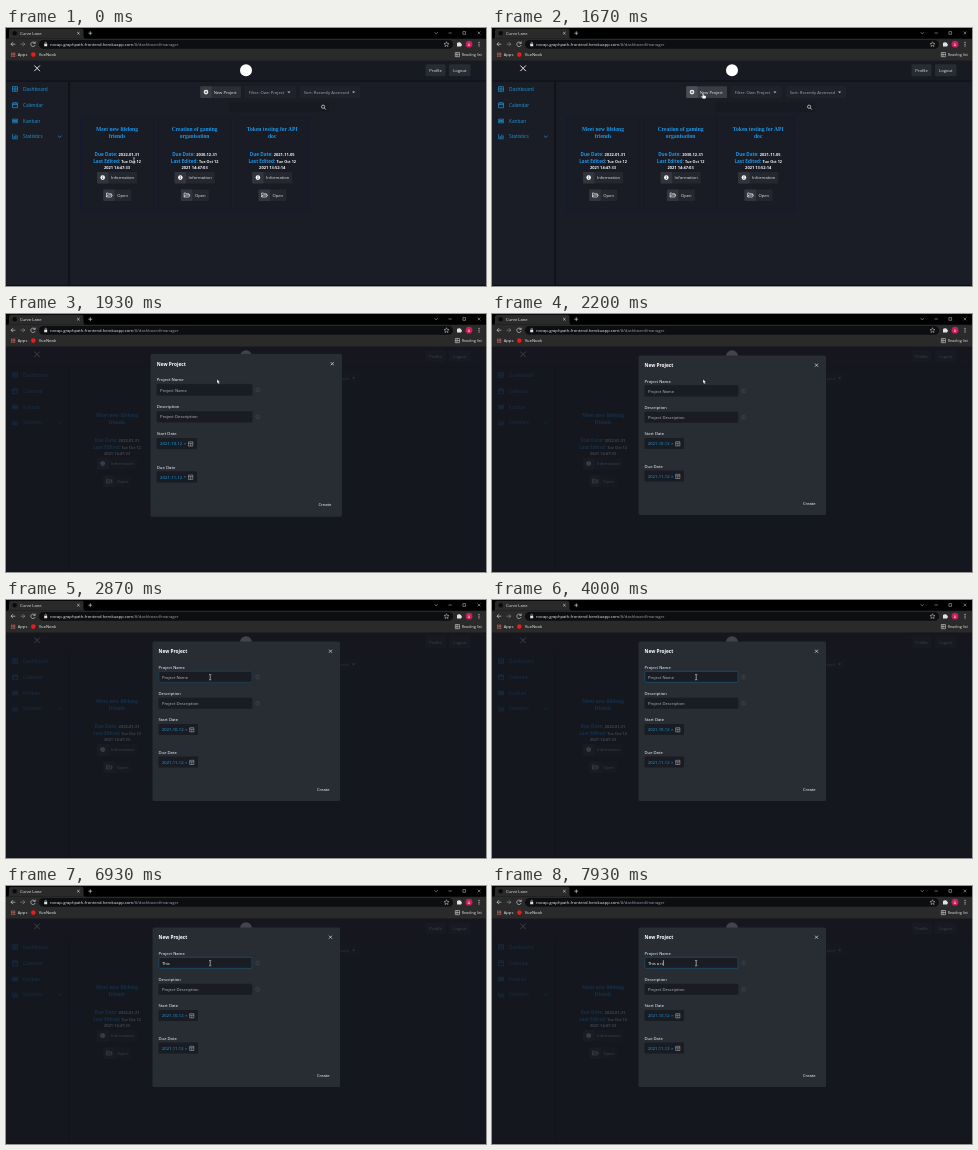
An HTML page for the animation above (8000 ms loop, 480 px wide and 258 px high).

```html
<!DOCTYPE html>
<html lang="en">
<head>
<meta charset="utf-8">
<title>New project dialog</title>
<style>
  html, body { margin: 0; width: 100%; height: 100%; overflow: hidden; background: #191c24; }
  svg { display: block; width: 100vw; height: 100vh; stroke-width: .7; }
  text { font: 4.18px "Open Sans", "Noto Sans", sans-serif; fill: #e4e6ea; white-space: pre; }
  #modal { transform-origin: 240.25px 121.25px; }
  .mid { text-anchor: middle; }
  .bar { font-size: 4.15px; fill: #e8eaed; }
  .side { font-size: 4.8px; fill: #2196dc; }
  .title { font: bold 5.55px "Liberation Serif", serif; fill: #1c96e8; }
  .key { font-size: 4.65px; font-weight: 700; fill: #1c96e8; }
  .val { font-size: 4px; font-weight: 700; fill: #f4f5f7; }
  .small { font-size: 3.75px; }
  .head { font-size: 4.75px; font-weight: 700; fill: #fff; }
  .label { fill: #fff; }
  .hint { fill: #b4b8be; }
  .date { fill: #259fe4; }
  .soft { fill: #a4a8b0; }
  .line { fill: none; stroke: #e4e6ea; }
  .blue { stroke: #2196dc; }
  .dim { opacity: .55; }
  .faint { opacity: .13; }
</style>
</head>
<body>
<svg viewBox="0 0 480 258" xmlns="http://www.w3.org/2000/svg">
  <g id="page">
    <rect width="480" height="258" fill="#1a1d25"/>
    <rect y="32" width="480" height="21" fill="#171a20"/>
    <rect y="52.5" width="480" height="1.2" fill="#0f1116"/>
    <rect x="62.3" y="53" width="1.8" height="205" fill="#101218"/>
    <path class="line" d="M28.3 37.5l5.6 5.6m0-5.6l-5.6 5.6" stroke-width="1"/>
    <circle cx="240" cy="42.3" r="6" fill="#fff"/>
  </g>
  <rect id="shade" y="32" width="480" height="226" fill="#14161f" opacity=".8"/>
  <g id="browser">
    <rect width="480" height="32.5" fill="#2a2a2b"/>
    <rect width="480" height="10.7" fill="#000"/>
    <path d="M1 10.8Q3 10.8 3 8.5V3Q3 .8 5 .8H75.5Q77.5 .8 77.5 3V8.5Q77.5 10.8 79.5 10.8Z" fill="#2a2a2b"/>
    <rect x="33" y="12" width="414" height="8.8" rx="4.4" fill="#0d0e10"/>
    <circle cx="8.7" cy="5.2" r="2.2" fill="#090a0c"/>
    <path class="line" d="M71.2 4l2.4 2.4m0-2.4l-2.4 2.4M82.4 5.2h3.8m-1.9-1.9v3.8" stroke-width=".6"/>
    <path class="line" d="M428.5 4.3l1.7 1.4 1.7-1.4M442.5 5h3.3M456.9 3.6h2.7v2.7h-2.7zM471.6 3.6l2.7 2.7m0-2.7l-2.7 2.7" stroke-width=".45"/>
    <path class="line" d="M9.3 16.2H5m2-2l-2 2 2 2M28.9 15.2a2.2 2.2 0 1 0 .2 1.8M29.2 13.6v1.8h-1.8" stroke-width=".6"/>
    <path class="line dim" d="M14.5 16.2h4.3m-2-2l2 2-2 2" stroke-width=".6"/>
    <path d="M38.2 15.8h3v2.5h-3zM451 14.8h1.3a.8 .8 0 0 1 1.6 0h1.3v1.3a.8 .8 0 0 1 0 1.6V18.6H451z" fill="#dfe1e5"/>
    <path class="line" d="M38.9 15.8v-.8a.8 .8 0 0 1 1.6 0v.8M438 15.6l1.8-.2.7-1.7.7 1.7 1.8.2-1.4 1.2.4 1.8-1.5-1-1.5 1 .4-1.8z" stroke-width=".45"/>
    <circle cx="463" cy="16.2" r="3.4" fill="#c2215c"/>
    <path d="M473 13.9v1m0 .8v1m0 .8v1" stroke="#e8eaed" stroke-width=".9"/>
    <path d="M5.2 25.2h4M5.2 26.7h4M5.2 28.2h4" stroke="#e0736a" stroke-width="1" stroke-dasharray="1 .5"/>
    <circle cx="27.3" cy="26.6" r="2.3" fill="#f01818"/>
    <path class="line" d="M449.3 24.5h4.2v4.2h-4.2zM449.3 26.6h4.2M451 24.5v4.2" stroke-width=".5"/>
  </g>
  <g id="modal">
    <rect x="146.5" y="41.5" width="187.5" height="159.5" rx="1.5" fill="#282c33"/>
    <path class="line" d="M323 49.7l3 3m0-3l-3 3"/>
  </g>
  <g id="field">
    <rect id="box" x="152.8" y="71.3" width="93.2" height="11" rx="1" fill="none" stroke-width=".6"/>
    <text id="typed" x="155.9" y="78.5" style="fill:#fff"></text>
    <rect id="caret" y="74.3" width=".6" height="5.5" fill="#fff"/>
    <g id="list">
      <rect x="152.5" y="84" width="94" height="13.5" fill="#222529"/>
      <path d="M157 82.4H232" stroke="#a3262e"/>
      <text x="156" y="92.3" style="font-size:3.7px;font-weight:700;fill:#fff">Token testing for API doc</text>
    </g>
  </g>
  <g id="pointer">
    <path id="arrow" d="M0 0v4.3l1-.9.7 1.6.8-.4-.7-1.5h1.3z" fill="#fff" stroke="#000" stroke-width=".25"/>
    <path id="hand" d="M-.6 0q.6-.6 1.2 0v2l2 .5q.7 .3 .5 1.2l-.5 1.8h-2.8l-1.7-2.3q.3-.7 1.3 0z" fill="#fff" stroke="#111" stroke-width=".25"/>
    <path id="beam" class="line" d="M-1.1-2.7q1.1 0 1.1 .5 0-.5 1.1-.5M0-2.2v4.4M-1.1 2.7q1.1 0 1.1-.5 0 .5 1.1 .5" stroke-width=".6"/>
  </g>
</svg>
<script>
const NS = "http://www.w3.org/2000/svg";
const $ = id => document.getElementById(id);

function add(parent, tag, attrs, content) {
  const el = document.createElementNS(NS, tag);
  for (const key in attrs) el.setAttribute(key, attrs[key]);
  if (content) el.textContent = content;
  parent.appendChild(el);
  return el;
}
const text = (p, x, y, s, cls = "") => add(p, "text", { x, y, class: cls }, s);
const rect = (p, x, y, width, height, fill, rx = 1) =>
  add(p, "rect", { x, y, width, height, fill, rx });
const path = (p, d, cls = "line") => add(p, "path", { d, class: cls });
const arrowDown = (p, x, y) => add(p, "path", { d: `M${x} ${y}h3.2l-1.6 1.9z`, fill: "#b4b8be" });

const page = $("page"), browser = $("browser"), modal = $("modal");

// Browser labels
text(browser, 14, 6.7, "Curve Lane", "bar");
const url = text(browser, 44, 17.8, "nocap-graphpath-frontend.herokuapp.com", "bar");
add(url, "tspan", { fill: "#9aa0a6" }, "/#/dashboard/manager");
text(browser, 463, 17.5, "A", "mid small");
text(browser, 11.7, 28, "Apps", "bar");
text(browser, 32.7, 28, "VueNook", "bar");
text(browser, 455.7, 28, "Reading list", "small");

// Header and toolbar
for (const [x, w, s] of [[419.5, 20, "Profile"], [443, 21.5, "Logout"]]) {
  rect(page, x, 36.3, w, 12, "#272b32");
  text(page, x + w / 2, 43.9, s, "mid");
}
const create = rect(page, 194.3, 58.3, 40.7, 11.8);
const createIcon = rect(page, 194.3, 58.3, 11.4, 11.8);
add(page, "circle", { cx: 200, cy: 64.1, r: 2.3, fill: "#fff" });
path(page, "M198.7 64.1h2.6m-1.3-1.3v2.6").style.stroke = "#383c43";
text(page, 207.7, 65.8, "New Project");
rect(page, 238.5, 58.3, 51.5, 11.8, "#1f222a");
text(page, 242.7, 65.8, "Filter: Own Project", "soft");
arrowDown(page, 281.3, 63.4);
rect(page, 294, 58.3, 60, 11.8, "#1f222a");
text(page, 297.7, 65.8, "Sort: Recently Accessed", "soft");
arrowDown(page, 346, 63.4);
rect(page, 223, 74, 100, 10.3, "#171a21");
add(page, "circle", { cx: 317.1, cy: 78.7, r: 1.6, class: "line" });
path(page, "M318.3 80l1.6 1.6");

// Sidebar
const icons = [
  "M6.5 58.7h5v4.6h-5zM6.5 61h5M9 58.7v4.6",
  "M6.5 75h5v4.7h-5zM6.5 76.6h5M8 74v1.5M10 74v1.5",
  "M6.5 91.2h5v1.3h-5zM6.5 93.5h5v1.3h-5z",
  "M6.7 106v4.8h5M8.3 110v-2M9.8 110v-3.5M11.2 110v-2.6"
];
["Dashboard", "Calendar", "Kanban", "Statistics"].forEach((name, i) => {
  path(page, icons[i], "line blue");
  text(page, 17, 63.1 + i * 15.7, name, "side");
});
path(page, "M52 107.7l1.8 1.7 1.8-1.7", "line blue");

// Project cards
function card(cx, lines, due, edited) {
  add(page, "rect", { x: cx - 36.7, y: 89, width: 73.4, height: 93,
    fill: "#191c25", stroke: "#15183a" });
  lines.forEach((s, i) => text(page, cx, 102.6 + i * 7, s, "title mid"));
  const pair = (y, key, val, cls) => {
    const row = text(page, cx, y, "", "mid");
    add(row, "tspan", { class: "key" }, key + " ");
    add(row, "tspan", { class: cls }, val);
  };
  pair(127.6, "Due Date:", due, "val");
  pair(134.7, "Last Edited:", "Tue Oct 12", "val small");
  text(page, cx, 141.4, "2021 " + edited, "val mid");
  const button = (x, y, w, s) => {
    rect(page, x, y, w, 11.5, "#24272e");
    rect(page, x, y, 11.5, 11.5, "#32353c");
    text(page, x + 14, y + 7.4, s);
  };
  button(cx - 20, 144, 40, "Information");
  add(page, "circle", { cx: cx - 14.3, cy: 149.6, r: 2.3, fill: "#fff" });
  path(page, `M${cx - 14.3} 148.2v.7m0 .5v1.7`).style.stroke = "#24272e";
  button(cx - 13.7, 161.5, 28, "Open");
  path(page, `M${cx - 10.5} 169v-4h1.7l.7 .8h2.5v1.2m-4.9 2l1-2h4.8l-1 2z`);
}
card(111, ["Meet new lifelong", "friends"], "2022-01-31", "14:47:33");
card(188.6, ["Creation of gaming", "organisation"], "2030-12-31", "14:47:03");
card(266.2, ["Token testing for API", "doc"], "2021-11-05", "13:52:14");
rect(page, 0, 257, 480, 1, "#0c0d11", 0);

// Dialog
text(modal, 152.6, 53.2, "New Project", "head");
[["Project Name", 68.6], ["Description", 95], ["Start Date", 121.2], ["Due Date", 153.9]]
  .forEach(([s, y]) => text(modal, 152.6, y, s, "label"));
rect(modal, 152.5, 71, 93.8, 11.6, "#191c22");
const hint = text(modal, 155.9, 78.5, "Project Name", "hint");
rect(modal, 152.5, 97.7, 93.8, 11, "#191c22");
text(modal, 155.9, 104.8, "Project Description", "hint");
for (const y of [76.9, 103.3]) {
  add(modal, "circle", { cx: 251.6, cy: y, r: 2, class: "line faint" });
  path(modal, `M251.6 ${y - 1}v2`, "line faint");
}
[["2021-10-12", 124], ["2021-11-12", 156.6]].forEach(([s, y]) => {
  rect(modal, 152.5, y, 39.5, 11, "#191c22");
  text(modal, 155.9, y + 7.1, s, "date");
  text(modal, 179, y + 7, "×", "date");
  path(modal, `M183.7 ${y + 3.7}h4.2v4.2h-4.2zM183.7 ${y + 5.2}h4.2M185.8 ${y + 5.2}v2.6`, "line dim");
});
text(modal, 317.3, 190.8, "Create", "mid label");
modal.appendChild($("field"));

// Timeline: [ms, value]
const LOOP = 8000, FPS = 15;
const SHADE = 1870, OPEN = 1930, FOCUS = 3470;
const typing = [[0, ""], [5530, "T"], [5930, "This"], [6330, "This "],
  [7530, "This a"], [7670, "This a "], [7930, "This a n"]];
const blink = [[0, 0], [FOCUS, 1], [4000, 0], [4530, 1], [6930, 0], [7470, 1]];
const moves = [[400, 128, 132.5], [1200, 211, 65.2], [2470, 211, 65.2], [2870, 204.2, 77.2]];

// Dialog bounces in with overshoot
const POP = 1838;
const pop = modal.animate([
  { opacity: 0, transform: "scale(.8)" },
  { opacity: 1, transform: "scale(1.02)" },
  { opacity: 1, transform: "scale(1)" }
].map(k => ({ ...k, easing: "cubic-bezier(.68,-.55,.27,1.55)" })), { duration: 300, fill: "both" });
pop.pause();

const at = (steps, t) => steps.reduce((v, s) => t >= s[0] ? s[1] : v, steps[0][1]);
const clamp = v => Math.max(0, Math.min(1, v));
const show = (el, on) => { el.style.display = on ? "inline" : "none"; };
const ease = k => k * k * (3 - 2 * k);

function position(t) {
  let [, x, y] = moves[0];
  for (let i = 1; i < moves.length; i++) {
    const [t0, x0, y0] = moves[i - 1], [t1, x1, y1] = moves[i];
    if (t < t0) break;
    const k = ease(clamp((t - t0) / (t1 - t0)));
    x = x0 + (x1 - x0) * k;
    y = y0 + (y1 - y0) * k;
  }
  return [x, y];
}

function draw(t) {
  const step = Math.floor((t + 5) * FPS / 1000) * 1000 / FPS;
  show($("shade"), t >= SHADE);
  pop.currentTime = step - POP;

  const [x, y] = position(step);
  $("pointer").setAttribute("transform", `translate(${x} ${y})`);
  const overButton = t < OPEN && x > 194 && x < 235 && y < 70;
  const overField = t >= OPEN && y > 71.3;
  const beam = overField || t < 400;
  const hand = overButton && t < SHADE;
  show($("beam"), beam);
  show($("hand"), hand);
  show($("arrow"), !beam && !hand);
  create.setAttribute("fill", overButton ? "#3a3d44" : "#2a2d34");
  createIcon.setAttribute("fill", overButton ? "#4a4d54" : "#383c43");

  const value = at(typing, t);
  const typed = $("typed");
  if (typed.textContent !== value) typed.textContent = value;
  $("box").setAttribute("stroke", t >= FOCUS ? "#1f6389" : overField ? "#1e506c" : "#20242b");
  show(hint, !value);
  show($("list"), value === "T");
  $("caret").setAttribute("x", 156 + (value ? typed.getComputedTextLength() : 0));
  show($("caret"), at(blink, t));
}

const start = performance.now();
function tick() {
  draw((performance.now() - start) % LOOP);
  requestAnimationFrame(tick);
}
tick();
</script>
</body>
</html>
```
